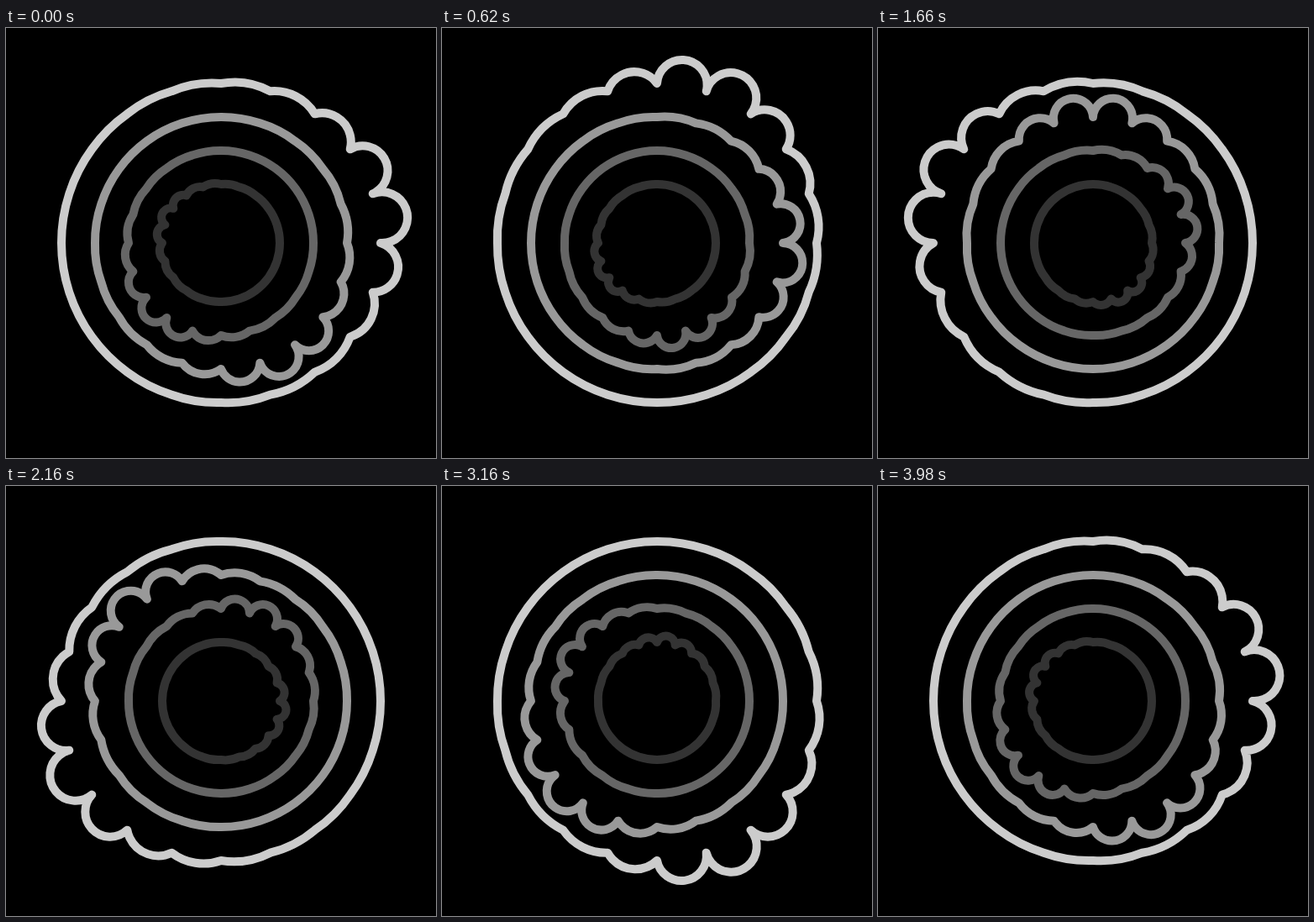
An HTML page with a canvas for the animation above (4 s loop, 512 by 512 pixels).

```html
<!DOCTYPE html>
<html lang="en">
<head>
<meta charset="utf-8">
<title>Scalloped rings</title>
<style>
  html, body { margin: 0; width: 100%; height: 100%; overflow: hidden; background: #000; }
  canvas { display: block; width: 512px; height: 512px; }
</style>
</head>
<body>
<canvas id="stage" width="512" height="512"></canvas>
<script>
const ctx = document.getElementById('stage').getContext('2d');
const TAU = Math.PI * 2;
const LOOP = 4000;
const LOBES = 20;
const HALF = Math.PI / LOBES;
const LEAD = -12.5 / 360 * TAU;
const LAG = TAU / 5;
const rings = [
  { radius: 190, color: '#ccc' },
  { radius: 150, color: '#999' },
  { radius: 110, color: '#666' },
  { radius: 70, color: '#333' }
];

// Each lobe joins two fixed points; its arc's centre slides outwards as the wave passes.
function drawRing({ radius, color }, peak) {
  const chordHalf = radius * Math.sin(HALF);
  const chordDist = radius * Math.cos(HALF);
  const reach = 1.06 * radius - 7;
  ctx.beginPath();
  for (let i = 0; i < LOBES; i++) {
    const angle = (2 * i + 1) * HALF;
    const wave = (1 + Math.cos(angle - peak)) / 2;
    const dist = reach * Math.pow(wave, 1.65);
    const gap = chordDist - dist;
    const spread = Math.atan2(chordHalf, gap);
    ctx.arc(dist * Math.cos(angle), dist * Math.sin(angle),
      Math.hypot(chordHalf, gap), angle - spread, angle + spread);
  }
  ctx.closePath();
  ctx.strokeStyle = color;
  ctx.stroke();
}

function draw(time) {
  const turn = (time % LOOP) / LOOP * TAU;
  ctx.setTransform(1, 0, 0, 1, 0, 0);
  ctx.fillStyle = '#000';
  ctx.fillRect(0, 0, 512, 512);
  ctx.translate(256, 256);
  ctx.lineWidth = 10;
  ctx.lineJoin = 'round';
  rings.forEach((ring, i) => drawRing(ring, LEAD + LAG * i - turn));
}

const start = performance.now();
function tick() {
  draw(performance.now() - start);
  requestAnimationFrame(tick);
}
tick();
</script>
</body>
</html>
```
